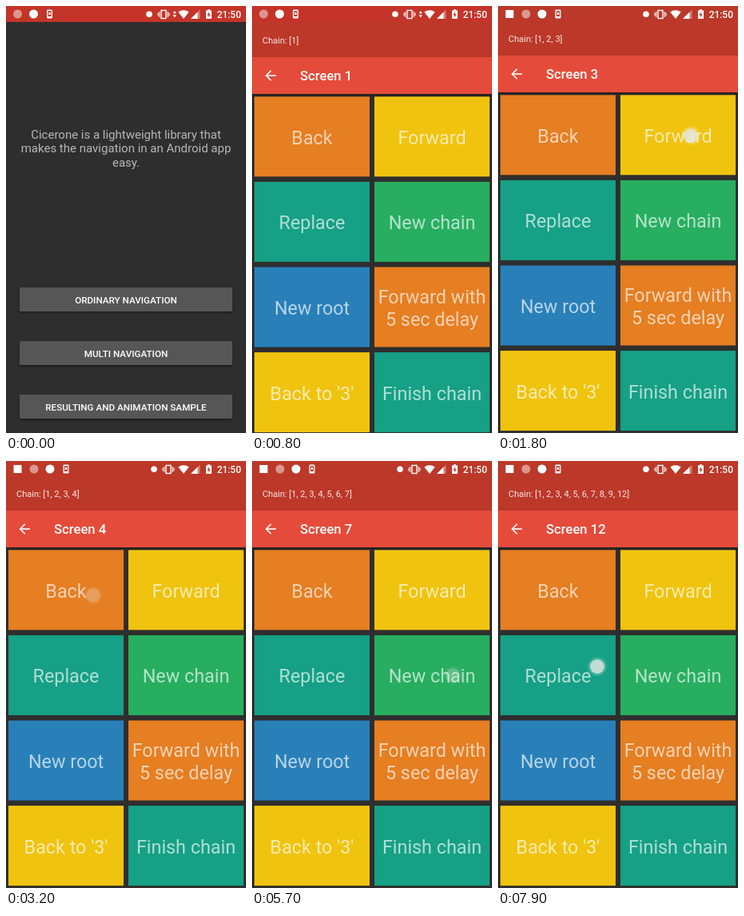
Animation, 300 px wide and 534 px high, one loop 8000 ms. Source, as an HTML page with a canvas:

```html
<!DOCTYPE html>
<html lang="en">
<head>
<meta charset="utf-8">
<title>Navigation demo</title>
<style>
  html, body { margin: 0; width: 100%; height: 100%; overflow: hidden; background: #2f2e2e; }
  canvas { display: block; width: 300px; height: 534px; }
</style>
</head>
<body>
<canvas id="stage" width="300" height="534"></canvas>
<script>
const W = 300, H = 534, LOOP = 8000, STEP = 100;
const stage = document.getElementById('stage').getContext('2d');
const layer = document.createElement('canvas');
layer.width = W;
layer.height = H;
const page = layer.getContext('2d');

const ORANGE = '#e67e22', YELLOW = '#f0c30f', TEAL = '#16a085', GREEN = '#27ae60', BLUE = '#2980b9';
const DARK = '#2f2e2e', RED = '#bc3829', BAR = '#e54b3a';

const tiles = [
  [ORANGE, 'Back'], [YELLOW, 'Forward'],
  [TEAL, 'Replace'], [GREEN, 'New chain'],
  [BLUE, 'New root'], [ORANGE, 'Forward with', '5 sec delay'],
  [YELLOW, "Back to '3'"], [TEAL, 'Finish chain']
];

// Each tap: time of release, position and what it does to the chain
const last = c => c[c.length - 1];
const stay = c => c;
const forward = c => [...c, last(c) + 1];
const back = c => c.slice(0, -1);
const newChain = c => [...c, last(c) + 1, last(c) + 2, last(c) + 3];
const replace = c => [...back(c), last(c) + 1];
const taps = [
  [400, 226, 368, stay],
  [1400, 241, 162, forward], [1600, 241, 162, forward],
  [1900, 241, 162, forward], [2300, 241, 162, forward],
  [3100, 109, 168, back], [3500, 109, 168, back],
  [3900, 109, 168, back], [4300, 109, 168, back],
  [5300, 266, 277, newChain], [5600, 251, 268, newChain], [6000, 267, 267, newChain],
  [7000, 124, 262, replace], [7300, 136, 273, replace],
  [8100, 124, 257, replace]
];

function text(c, str, x, y, size, color, weight = 400, align = 'left') {
  c.font = `${weight} ${size}px Roboto, sans-serif`;
  c.textAlign = align;
  c.fillStyle = color;
  c.fillText(str, x, y);
}

function rect(c, color, x, y, w, h) {
  c.fillStyle = color;
  c.fillRect(x, y, w, h);
}

function disc(c, color, x, y, r) {
  c.fillStyle = color;
  c.beginPath();
  c.arc(x, y, r, 0, Math.PI * 2);
  c.fill();
}

function poly(c, color, ...pts) {
  c.fillStyle = color;
  c.beginPath();
  for (let i = 0; i < pts.length; i += 2) c.lineTo(pts[i], pts[i + 1]);
  c.fill();
}

function line(c, width, ...pts) {
  c.strokeStyle = '#fff';
  c.lineWidth = width;
  c.beginPath();
  for (let i = 0; i < pts.length; i += 2) c.lineTo(pts[i], pts[i + 1]);
  c.stroke();
}

function drawHome(c) {
  rect(c, DARK, 0, 0, W, H);
  ['Cicerone is a lightweight library that', 'makes the navigation in an Android app', 'easy.']
    .forEach((s, i) => text(c, s, 150, 165.5 + i * 17.5, 15, '#b8b7b7', 400, 'center'));
  ['ORDINARY NAVIGATION', 'MULTI NAVIGATION', 'RESULTING AND ANIMATION SAMPLE'].forEach((s, i) => {
    const y = 352 + i * 67;
    c.save();
    c.shadowColor = 'rgba(0,0,0,.45)';
    c.shadowBlur = 3;
    c.shadowOffsetY = 1.5;
    c.fillStyle = '#565656';
    c.beginPath();
    c.roundRect(17, y, 266, 30, 1.5);
    c.fill();
    c.restore();
    text(c, s, 150, y + 19.5, 11.67, '#fff', 500, 'center');
  });
}

function drawScreen(c, chain) {
  rect(c, DARK, 0, 0, W, H);
  rect(c, RED, 0, 0, W, 62);
  rect(c, BAR, 0, 62, W, 46);
  const shade = c.createLinearGradient(0, 108, 0, 112);
  shade.addColorStop(0, 'rgba(0,0,0,.35)');
  shade.addColorStop(1, 'rgba(0,0,0,0)');
  text(c, `Chain: [${chain.join(', ')}]`, 13, 45, 11, 'rgba(255,255,255,.88)');
  text(c, `Screen ${last(chain)}`, 60, 91.3, 16.67, '#fff', 500);
  line(c, 1.6, 30, 85, 18, 85);
  line(c, 1.6, 23.8, 78.9, 17.7, 85, 23.8, 91.1);
  tiles.forEach(([color, ...rows], i) => {
    const x = i % 2 ? 153 : 3;
    const y = 111.3 + Math.floor(i / 2) * 106.6;
    rect(c, color, x, y, 144, 100);
    rows.forEach((s, k) => {
      const dy = (k - (rows.length - 1) / 2) * 27.5;
      text(c, s, x + 72, y + 59.5 + dy, 23.33, 'rgba(255,255,255,.66)', 400, 'center');
    });
  });
  rect(c, shade, 0, 108, W, 4);
}

function drawStatus(c, color, busy) {
  const mail = busy ? 0 : 20.5;
  const right = busy ? 0 : 6;
  rect(c, color, 0, 0, W, 20);
  if (!busy) rect(c, '#fff', 9.5, 5, 10, 10);

  disc(c, '#dc968e', 14.5 + mail, 10, 5.5);
  disc(c, '#fff', 34.5 + mail, 10, 5.5);
  c.fillStyle = '#fff';
  c.beginPath();
  c.roundRect(51 + mail, 4.5, 7, 11, 1.3);
  c.fill();
  rect(c, color, 52.3 + mail, 6.3, 4.4, 6.6);
  rect(c, '#fff', 53.3 + mail, 8, 2.4, 3);

  disc(c, '#fff', 179 + right, 10.3, 3.8);
  c.strokeStyle = '#fff';
  c.lineWidth = 1.4;
  c.strokeRect(194 + right, 5.5, 6, 10);
  line(c, 1.1, 191.8 + right, 7, 191.8 + right, 14);
  line(c, 1.1, 202.2 + right, 7, 202.2 + right, 14);
  line(c, 1.1, 190 + right, 8.5, 190 + right, 12.5);
  line(c, 1.1, 204 + right, 8.5, 204 + right, 12.5);
  if (busy) {
    poly(c, '#fff', 208.5, 9.3, 210.8, 6, 213, 9.3);
    poly(c, '#fff', 208.5, 11.3, 210.8, 14.6, 213, 11.3);
  }
  c.fillStyle = '#fff';
  c.beginPath();
  c.moveTo(222, 16);
  c.lineTo(215.3, 7.6);
  c.quadraticCurveTo(222, 2.8, 228.7, 7.6);
  c.fill();
  poly(c, 'rgba(255,255,255,.35)', 231, 16, 242.5, 16, 242.5, 4.5);
  poly(c, '#fff', 231, 16, 239.5, 16, 239.5, 7.5);
  rect(c, '#fff', 250, 5.5, 7, 10.5);
  rect(c, '#fff', 252, 4.3, 3, 2);
  poly(c, color, 254, 7, 251.3, 11.4, 253.2, 11.4, 253, 14.6, 255.7, 10.2, 253.8, 10.2);
  text(c, '21:50', 263.7, 14.6, 11.9, '#fff', 500);
}

function drawTouch(c, x, y, alpha) {
  c.save();
  c.globalAlpha = alpha;
  const glow = c.createRadialGradient(x, y, 7, x, y, 13);
  glow.addColorStop(0, 'rgba(255,255,255,.4)');
  glow.addColorStop(1, 'rgba(255,255,255,0)');
  disc(c, glow, x, y, 13);
  disc(c, 'rgba(224,228,222,.72)', x, y, 8.8);
  c.restore();
}

function touchAlpha(dt) {
  if (dt < -200 || dt >= 200) return 0;
  return dt < 0 ? 1 : dt < 100 ? .6 : .3;
}

function draw(t) {
  const chain = taps.reduce((c, tap) => t >= tap[0] ? tap[3](c) : c, [1]);
  // The new page rises and fades in
  const p = Math.min(1, Math.max(0, (t - 440) / 440));
  const shown = Math.min(1, p * 1.98);
  const rise = 43 * Math.pow(1 - p, 1.7);

  if (p < 1) drawHome(stage);
  if (p > 0) {
    drawScreen(page, chain);
    stage.globalAlpha = shown;
    stage.drawImage(layer, 0, Math.round(rise));
    stage.globalAlpha = 1;
  }
  drawStatus(stage, p < 1 ? '#c43428' : RED, t < 1400);
  for (const [time, x, y] of taps) {
    const alpha = touchAlpha(t - time);
    if (alpha) drawTouch(stage, x, y, alpha);
  }
}

function frame() {
  const t = performance.now() % LOOP;
  draw(Math.floor(t / STEP) * STEP);
  requestAnimationFrame(frame);
}
frame();
</script>
</body>
</html>
```
